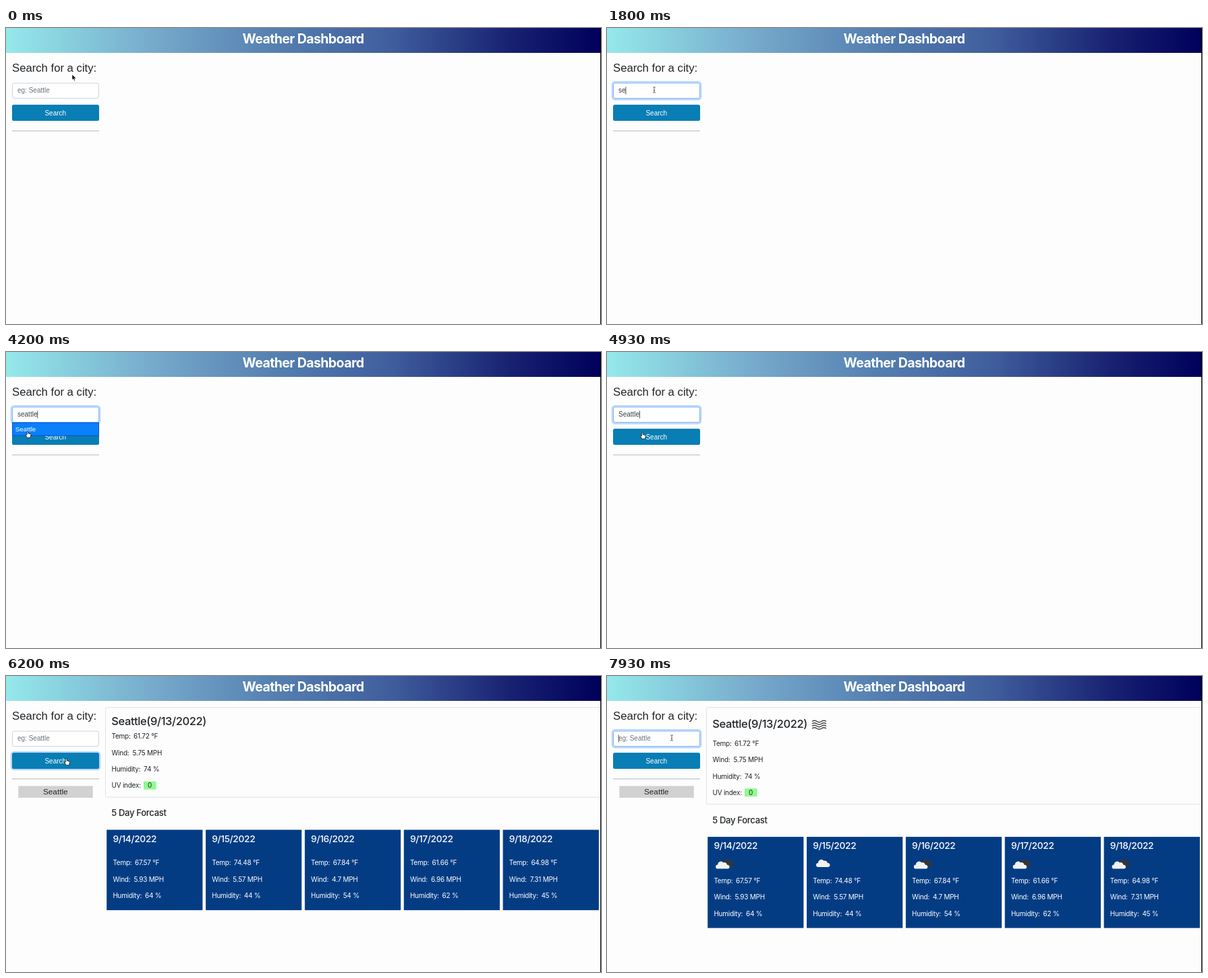
Write an HTML page that moves like this. It is 882 by 440 pixels and loops after 8000 ms.

```html
<!DOCTYPE html>
<html lang="en">
<head>
<meta charset="utf-8">
<title>Weather Dashboard</title>
<style>
html, body { margin: 0; height: 100%; overflow: hidden; background: #fdfdfd; }
svg { display: block; width: 882px; height: 440px; }
text { font: 10px "Liberation Sans", Arial, sans-serif; fill: #212529; white-space: pre; }
#weather text, .title { font-family: Inter, sans-serif; letter-spacing: -.025em; }
#weather .big { font-size: 16.5px; font-weight: 500; }
#weather .sub { font-size: 13.1px; font-weight: 500; }
#weather .date { font-size: 13.75px; font-weight: 500; }
.card text, .white { fill: #fff; }
.mid { text-anchor: middle; }
.glow { fill: none; stroke: #0d6efd; stroke-opacity: .27; stroke-width: 2.5; }
</style>
</head>
<body>
<svg viewBox="0 0 882 440">
  <defs>
    <linearGradient id="sky">
      <stop stop-color="#95e9eb"/>
      <stop offset=".25" stop-color="#76a9cb"/>
      <stop offset=".45" stop-color="#5580b1"/>
      <stop offset=".65" stop-color="#3f5d9c"/>
      <stop offset=".85" stop-color="#172171"/>
      <stop offset="1" stop-color="#00005a"/>
    </linearGradient>
    <path id="cloud" d="M3 11.5a3 3 0 0 1 .3-6A4.6 4.6 0 0 1 11.500 2.300A4 4 0 0 1 17 5.700a3 3 0 0 1 1.500 5.800z"/>
  </defs>

  <rect width="882" height="440" fill="#fdfdfd"/>
  <rect width="882" height="37" fill="url(#sky)"/>
  <text class="title white mid" x="440.5" y="23.3" style="font-size:19.5px;font-weight:700;letter-spacing:-.03em">Weather Dashboard</text>

  <text x="9" y="65" style="font-size:16.7px">Search for a city:</text>
  <rect id="input" x="9.5" y="82" width="128" height="22.500" rx="2.5" fill="#fff"/>
  <rect id="inputGlow" class="glow" x="7.9" y="80.300" width="131.200" height="25.900" rx="4"/>
  <text id="value" x="17" y="96.3"></text>
  <path id="caret" stroke="#222" stroke-width=".8"/>
  <rect x="9" y="114" width="129" height="24" rx="2.5" fill="#087eb4"/>
  <rect id="buttonGlow" class="glow" x="7.900" y="112.900" width="131.200" height="26.200" rx="4"/>
  <text class="white mid" x="73.3" y="129.500">Search</text>
  <rect x="9" y="152.300" width="129" height="1.300" fill="#c9c9c9"/>
  <g id="history">
    <rect x="18.300" y="163.500" width="110.400" height="17.500" fill="#d1d1d1"/>
    <text class="mid" x="73.300" y="176.300" style="font-size:11.75px">Seattle</text>
  </g>
  <g id="menu">
    <rect id="menuItem" x="9.500" y="105" width="128" height="19.300"/>
    <text id="menuText" x="13.800" y="118" style="font-size:9.8px">Seattle</text>
  </g>

  <g id="weather"></g>
  <rect x="881" width="1" height="440"/>

  <g id="cursor">
    <path id="arrow" d="M0 0V8.300L1.900 6.500 3.200 9.400 4.600 8.800 3.400 6H6Z" stroke="#fff" stroke-width=".6"/>
    <path id="ibeam" d="M-2-4.200Q0-4.200 0-3.200Q0-4.200 2-4.200M0-3.400V3.400M-2 4.200Q0 4.200 0 3.200Q0 4.200 2 4.200M-1 .8H1" fill="none" stroke="#555" stroke-width=".9"/>
    <path id="hand" d="M-.9 5V.6a.9.9 0 0 1 1.800 0V3l3.300.7q.8.300.8 1.200l-.8 4.500H-.4L-2.800 5.700q.3-1.300 1.200-.6z" fill="#fff" stroke="#111" stroke-width=".8"/>
  </g>
</svg>
<script>
const LOOP = 8000;
const FOCUS = 660, OPEN = 3330, PICK = 4600, PRESS = 5400, SEARCH = 5600,
      RESULT = 6200, ICONS = 6260, REFOCUS = 7860;
const KEYS = [1530, 1800, 2060, 2330, 2530, 2800, 3000];
const PATH = [[60, 98, 69], [860, 70, 92], [3700, 70, 92], [4150, 32, 118], [4650, 32, 118],
              [5350, 89.5, 123], [7230, 89.5, 123], [7400, 93.5, 108], [7860, 96, 92]];
const DAYS = [[67.57, 5.93, 64], [74.48, 5.57, 44], [67.84, 4.7, 54], [61.66, 6.96, 62], [64.98, 7.31, 45]];

const el = id => document.getElementById(id);
const show = (id, on) => el(id).style.display = on ? '' : 'none';
const set = (id, attrs) => Object.entries(attrs).forEach(([k, v]) => el(id).setAttribute(k, v));
const text = (x, y, s, cls = '') => `<text x="${x}" y="${y}" class="${cls}">${s}</text>`;

function readings(x, y, [temp, wind, humidity]) {
  return [['Temp:', 32.6, temp + ' °F'], ['Wind:', 31, wind + ' MPH'], ['Humidity:', 47.6, humidity + ' %']]
    .map(([label, dx, value], i) => text(x, y + i * 24.5, label) + text(x + dx, y + i * 24.5, value)).join('');
}

function card(day, i, top, iconGap) {
  const x = 149.2 + i * 146.85;
  const back = i === 1 ? '' : `<use href="#cloud" transform="translate(${x + 22} ${top + 32.500}) scale(.82 1)" fill="#34353a"/>`;
  const icon = `${back}<use href="#cloud" x="${x + (i === 1 ? 13.8 : 11.800)}" y="${top + (i === 1 ? 33.300 : 36)}" fill="#f2f2f2"/>`;
  return `<g class="card"><rect x="${x}" y="${top}" width="142.200" height="${119.500 + iconGap}" fill="#043c84"/>`
    + text(x + 9.200, top + 18.300, `9/${14 + i}/2022`, 'date')
    + (iconGap ? icon : '') + readings(x + 9.200, top + 52.500 + iconGap, day) + '</g>';
}

function weather(icons) {
  const shift = icons ? 10.5 : 0;
  const wave = y => `M304 ${y}q3.500-2.600 7 0t7 0t7 0`;
  const mist = `<path d="${[67.5, 71, 74.500, 78].map(wave).join('')}" fill="none" stroke="#444" stroke-width="1.500"/>`;
  return `<rect x="147.500" y="46.800" width="734.500" height="${133.300 + shift}" rx="2.500" fill="none" stroke="#e2e2e2"/>`
    + text(156.300, icons ? 76.700 : 73, 'Seattle(9/13/2022)', 'big') + (icons ? mist : '')
    + readings(156.500, 93 + shift, [61.72, 5.75, 74])
    + `<rect x="204" y="${156.700 + shift}" width="18.500" height="12" fill="#90fb90"/>`
    + text(156.500, 166.400 + shift, 'UV index:') + text(210, 166.400 + shift, '0')
    + text(156.200, 208 + shift, '5 Day Forcast', 'sub')
    + DAYS.map((day, i) => card(day, i, 228.600 + shift, icons ? 16 : 0)).join('');
}

function pointer(t) {
  const next = PATH.findIndex(p => p[0] > t);
  if (next === 0) return PATH[0].slice(1);
  if (next < 0) return PATH.at(-1).slice(1);
  const [a, b] = [PATH[next - 1], PATH[next]];
  const u = (t - a[0]) / (b[0] - a[0]), e = u * u * (3 - 2 * u);
  return [a[1] + (b[1] - a[1]) * e, a[2] + (b[2] - a[2]) * e];
}

let stage = '';
function draw(t) {
  const typed = t < PICK ? 'seattle'.slice(0, KEYS.filter(k => k <= t).length) : t < SEARCH ? 'Seattle' : '';
  const focused = t >= FOCUS && t < PRESS || t >= REFOCUS;
  const lastEdit = [FOCUS, ...KEYS, PICK, REFOCUS].filter(k => k <= t).pop();
  const menuOpen = t >= OPEN && t < PICK;

  set('input', { stroke: focused ? '#86b7fe' : '#ced4da' });
  show('inputGlow', focused);
  show('buttonGlow', t >= PRESS && t < REFOCUS);
  el('value').textContent = typed || 'eg: Seattle';
  el('value').style.fill = typed ? '#3b4046' : '#6c757d';
  const caretX = 17.3 + (typed ? el('value').getComputedTextLength() : 0);
  set('caret', { d: `M${caretX} 87.500V98.500` });
  show('caret', focused && Math.floor((t - lastEdit) / 500) % 2 === 0);
  show('history', t >= SEARCH);

  const [x, y] = pointer(t);
  const hover = menuOpen && y > 104.5;
  show('menu', menuOpen);
  set('menuItem', { fill: hover ? '#0a80fa' : '#fff', stroke: hover ? '#0a4fd0' : '#c5c5c5' });
  el('menuText').style.fill = hover ? '#fff' : '#333';

  const kind = y > 81.5 && y < 104.5 ? 'ibeam' : hover || y > 114 ? 'hand' : 'arrow';
  ['arrow', 'ibeam', 'hand'].forEach(k => show(k, k === kind));
  set('cursor', { transform: `translate(${x} ${y})` });

  const now = t < RESULT ? 'none' : t < ICONS ? 'plain' : 'icons';
  if (now !== stage) {
    stage = now;
    el('weather').innerHTML = now === 'none' ? '' : weather(now === 'icons');
  }
}

const start = performance.now();
function tick() {
  draw((performance.now() - start) % LOOP);
  requestAnimationFrame(tick);
}
tick();
</script>
</body>
</html>
```
